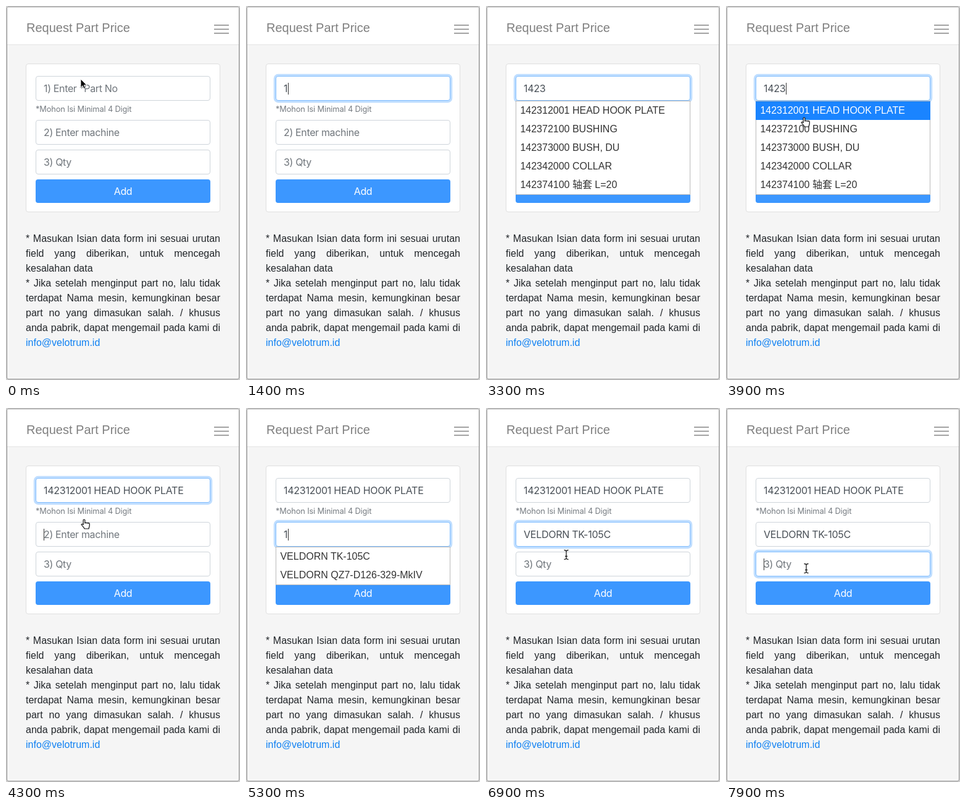
Animation, 379 px wide and 604 px high, one loop 8 s. Source, as an HTML page:

```html
<!DOCTYPE html>
<html lang="id">
<head>
<meta charset="utf-8">
<title>Request Part Price</title>
<style>
  html, body { margin: 0; width: 100%; height: 100%; overflow: hidden; background: #d2d2d2; }
  * { box-sizing: border-box; }
  #stage {
    position: absolute; left: 0; top: 0; width: 379px; height: 604px; overflow: hidden;
    font: 16px/24px "Liberation Sans", "Noto Sans CJK SC", "Noto Sans CJK", sans-serif; color: #212529;
  }
  #stage > * { position: absolute; }
  .page { inset: 1px; background: #f5f5f5; border: 1px solid #929292; border-radius: 3px; overflow: hidden; }
  .nav { height: 61px; background: #fff; border-bottom: 1px solid #e4e4e4; }
  h1 { left: 33px; top: 20px; margin: 0; font-size: 20px; line-height: 30px; font-weight: 400; color: #7f7f7f; white-space: nowrap; }
  .menu { left: 337px; top: 29.5px; width: 24px; height: 15px; }
  .card { left: 32px; top: 93px; width: 315px; height: 240px; background: #fff; border: 1px solid #dfdfdf; border-radius: 4px; }

  .field, .hint, .add { font-family: Inter, Roboto, sans-serif; letter-spacing: -.35px; white-space: pre; }
  .field {
    --g: 0;
    left: 48px; width: 283px; height: 40px; padding-left: 12px;
    display: flex; align-items: center; background: #fff; color: #495057;
    border: 1px solid color-mix(in srgb, #80bdff calc(var(--g) * 100%), #ced4da);
    border-radius: 4px;
    box-shadow: 0 0 0 3.2px rgb(0 123 255 / calc(var(--g) * .25));
  }
  .field .val { letter-spacing: -.26px; }
  .field .val:not(:empty) { padding-right: .6px; }
  .field .hold { color: #70767c; }
  .caret { width: 1px; height: 19px; margin-right: -1px; background: #333; }
  .hint { left: 48px; top: 157px; font-size: 12.8px; line-height: 20px; letter-spacing: -.13px; color: #757b81; }
  .add { left: 48px; top: 280px; width: 283px; height: 38px; line-height: 38px; text-align: center; color: #fff; background: #3c97ff; border-radius: 4px; }

  .list { left: 48px; width: 283px; margin: 0; padding: 0; list-style: none; background: #fff; border: 1px solid #b9b9b9; color: #333; }
  .list li { height: 30px; padding: 3px 6.4px; white-space: nowrap; }
  .list li.active { margin: 0 -1px; padding-left: 7.4px; background: #1a84ff; color: #fff; }

  .note { left: 32px; top: 364px; width: 315px; margin: 0; text-align: justify; }
  .note span { color: #0f80f2; }
  .cursor { left: 0; top: 0; width: 18px; height: 20px; overflow: visible; }
</style>
</head>
<body>
<div id="stage">
  <div class="page"><div class="nav"></div></div>
  <h1>Request Part Price</h1>
  <svg class="menu"><path d="M0 1H24M0 7.5H24M0 14H24" stroke="#858585" stroke-width="1.7"/></svg>
  <div class="card"></div>

  <div class="field" style="top:113px"><span class="val"></span><i class="caret"></i><span class="hold">1) Enter *Part No</span></div>
  <div class="hint">*Mohon Isi Minimal 4 Digit</div>
  <div class="field" style="top:184px"><span class="val"></span><i class="caret"></i><span class="hold">2) Enter machine</span></div>
  <div class="field" style="top:232px"><span class="val"></span><i class="caret"></i><span class="hold">3) Qty</span></div>
  <div class="add">Add</div>

  <ul class="list" style="top:153px">
    <li>142312001 HEAD HOOK PLATE</li>
    <li>142372100 BUSHING</li>
    <li>142373000 BUSH, DU</li>
    <li>142342000 COLLAR</li>
    <li>142374100 轴套 L=20</li>
  </ul>
  <ul class="list" style="top:224px">
    <li>VELDORN TK-105C</li>
    <li>VELDORN QZ7-D126-329-MkIV</li>
  </ul>

  <p class="note">* Masukan Isian data form ini sesuai urutan field yang diberikan, untuk mencegah kesalahan data<br>* Jika setelah menginput part no, lalu tidak terdapat Nama mesin, kemungkinan besar part no yang dimasukan salah. / khusus anda pabrik, dapat mengemail pada kami di <span>info@velotrum.id</span></p>

  <svg class="cursor">
    <g id="arrow"><path d="M0 0V13.5L3.1 10.7 5.2 15.5 7.5 14.5 5.4 9.8H9.7Z" fill="#000" stroke="#fff" stroke-width=".9"/></g>
    <g id="beam"><path d="M-3.5-7.5Q0-7.5 0-5V5Q0 7.5-3.5 7.5M3.5-7.5Q0-7.5 0-5V5Q0 7.5 3.5 7.5M-2 2.5H2" fill="none" stroke="#222" stroke-width="1.3"/></g>
    <g id="hand"><path transform="scale(1.12 1) translate(-5.7 -1)" d="M4.5 9.5V2.2a1.2 1.2 0 0 1 2.4 0V7a1.2 1.2 0 0 1 2.2 0 1.2 1.2 0 0 1 2.2.5 1.1 1.1 0 0 1 2.2.6V11c0 2-1 2.5-1 5H6.2c-.5-2-2-3-4.2-6.2C1.2 8.4 2.8 7.6 4.5 9.5Z" fill="#fff" stroke="#111" stroke-width="1.1" stroke-linejoin="round"/></g>
  </svg>
</div>
<script>
  const LOOP = 8000;
  const all = sel => [...document.querySelectorAll(sel)];

  // Times in ms; caret, open and hover are lists of [from, to].
  const fields = [
    {
      focus: [600, 4300],
      caret: [[600, 1000], [1400, 1700], [2000, 2900], [3100, 3300], [3600, 4100]],
      text: [[1400, '1'], [2000, '14'], [2400, '142'], [2600, '1423'], [4300, '142312001 HEAD HOOK PLATE']]
    },
    {
      focus: [4300, 6900],
      caret: [[4300, 4800], [5200, 5800], [6300, 6900]],
      text: [[5200, '1'], [6900, 'VELDORN TK-105C']]
    },
    { focus: [6900, LOOP], caret: [[7000, 7500], [7900, LOOP]], text: [] }
  ];
  const lists = [
    { open: [[3300, 4300]], hover: [[3700, 4300]] },
    { open: [[4500, 6900]], hover: [[6500, 6900]] }
  ];
  // [time, shape, x, y]; no shape means hidden
  const path = [
    [0, 'arrow', 121, 118], [100, 'arrow', 121, 118], [300, 'beam', 128, 134],
    [1400], [3500, 'beam', 128, 134], [3700, 'hand', 127, 160], [3900, 'hand', 126.5, 180],
    [4300, 'hand', 126.5, 180], [4900], [5600, 'beam', 134, 217], [5800, 'beam', 134, 217],
    [6000, 'hand', 132, 236], [6300, 'hand', 132, 236], [6700, 'hand', 130, 237],
    [6900, 'beam', 130, 237], [7400, 'beam', 130, 239], [7700, 'beam', 130, 259]
  ];

  const fieldEls = all('.field').map(el => ({
    el,
    val: el.querySelector('.val'),
    bar: el.querySelector('.caret'),
    hold: el.querySelector('.hold')
  }));
  const listEls = all('.list');
  const cursor = document.querySelector('.cursor');
  const shapes = all('.cursor g');

  const within = (t, spans) => spans.some(([a, b]) => t >= a && t < b);
  const ramp = (t, start) => Math.min(1, Math.max(0, (t - start) / 150));
  const show = (el, on) => { el.style.visibility = on ? 'visible' : 'hidden'; };

  function drawField({ focus, caret, text }, i, t) {
    const { el, val, bar, hold } = fieldEls[i];
    const typed = text.findLast(([at]) => t >= at)?.[1] ?? '';
    val.textContent = typed;
    hold.style.display = typed ? 'none' : '';
    show(bar, within(t, caret));
    el.style.setProperty('--g', ramp(t, focus[0]) - ramp(t, focus[1]));
  }

  function drawCursor(t) {
    const i = path.findLastIndex(([at]) => t >= at);
    const [at, shape, x, y] = path[i];
    shapes.forEach(g => show(g, g.id === shape));
    if (!shape) return;
    const next = path[i + 1];
    const to = next?.[1] ? next : [LOOP, shape, x, y];
    const k = (t - at) / (to[0] - at);
    cursor.style.transform = `translate(${x + (to[2] - x) * k}px, ${y + (to[3] - y) * k}px)`;
  }

  function draw(t) {
    fields.forEach((f, i) => drawField(f, i, t));
    lists.forEach(({ open, hover }, i) => {
      show(listEls[i], within(t, open));
      listEls[i].firstElementChild.classList.toggle('active', within(t, hover));
    });
    drawCursor(t);
  }

  const start = performance.now();
  function tick() {
    draw((performance.now() - start) % LOOP);
    requestAnimationFrame(tick);
  }
  tick();
</script>
</body>
</html>
```
